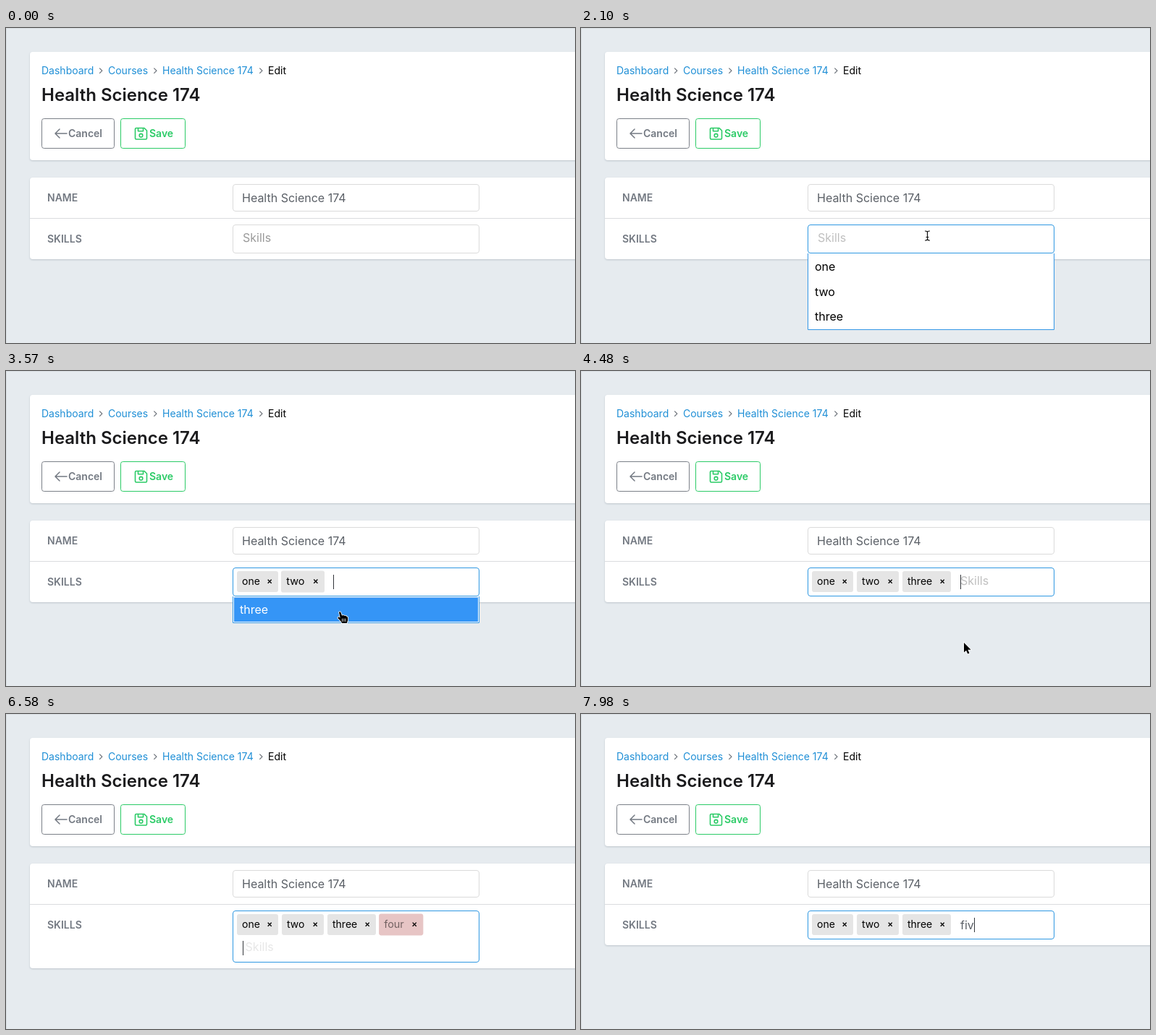
Write an HTML page that moves like this. It is 786x436 px and loops after 8000 ms.

```html
<!DOCTYPE html>
<html lang="en">
<head>
<meta charset="utf-8">
<title>Edit course</title>
<style>
  html, body { margin: 0; width: 100%; height: 100%; overflow: hidden; background: #e6ebef; }
  svg { display: block; width: 786px; height: 436px; font: 16px Inter, Roboto, sans-serif; }
  text { white-space: pre; }
  .sm { font-size: 14px; }
  .semi { font-weight: 600; }
  .link { fill: #1f8fd6; }
  .label { fill: #737982; }
  .value { fill: #5b6067; }
  .card { fill: #fff; filter: drop-shadow(0 1px 1.2px rgba(30, 45, 60, .2)); }
  .line { fill: none; stroke-linecap: round; stroke-linejoin: round; }
</style>
</head>
<body>
<svg viewBox="0 0 786 436">
  <rect width="786" height="436" fill="#e6ebef"/>
  <path d="M0 .5H786M.5 0V436" stroke="#d9dee2" fill="none"/>

  <rect class="card" x="33" y="33" width="780" height="150" rx="4"/>
  <g class="sm">
    <text class="link" x="49" y="64">Dashboard</text>
    <text class="link" x="141" y="64">Courses</text>
    <text class="link" x="216" y="64">Health Science 174</text>
    <text x="362" y="64">Edit</text>
  </g>
  <path class="line" stroke="#666c74" stroke-width="1.2"
    d="M129.5 55.8l3.3 3.3-3.3 3.3M204.7 55.8l3.3 3.3-3.3 3.3M350.7 55.8l3.3 3.3-3.3 3.3"/>
  <text class="semi" x="49" y="101" font-size="24" fill="#1b1b1d">Health Science 174</text>

  <rect x="49.5" y="125.5" width="100" height="41" rx="3" fill="#fff" stroke="#7b8088"/>
  <path class="line" stroke="#737982" stroke-width="1.5" d="M84 146H68.5M74 140l-6 6 6 6"/>
  <text class="sm semi label" x="86" y="151">Cancel</text>

  <rect x="158.5" y="125.5" width="89" height="41" rx="3" fill="#fff" stroke="#2bcb66"/>
  <path class="line" stroke="#2bcb66" stroke-width="1.6"
    d="M180 138.5h11l3.5 3.5v10.500q0 1.500-1.500 1.500h-13q-1.500 0-1.500-1.500v-12.500q0-1.500 1.500-1.500M182.500 138.800v4h7v-4"/>
  <circle cx="186.500" cy="148.700" r="2.300" fill="none" stroke="#2bcb66" stroke-width="1.600"/>
  <text class="sm semi" x="198" y="151" fill="#2bcb66">Save</text>

  <rect id="card" class="card" x="33" y="207" width="780" height="113" rx="4"/>
  <path d="M33 263.5H786" stroke="#dadcdf"/>
  <text class="sm semi label" x="57" y="240">NAME</text>
  <text class="sm semi label" x="57" y="297">SKILLS</text>
  <rect x="313.5" y="216.5" width="340" height="37" rx="3.5" fill="#fff" stroke="#dbdbdb"/>
  <text class="value" x="326" y="241">Health Science 174</text>

  <rect id="field" x="313.5" y="272.5" width="340" height="39" rx="3.5" fill="#fff"/>
  <g id="tags"></g>
  <text id="hint">Skills</text>
  <text id="typed" class="value"></text>
  <rect id="caret" width="1" height="20" fill="#33363b"/>

  <g id="list">
    <path id="box" fill="#fff" stroke="#3397e6"/>
  </g>

  <g id="arrow">
    <path d="M0 0V13.500L3.100 10.700 5.200 15.500 7.500 14.500 5.400 9.800H9.600Z" stroke="#fff" stroke-width="1.600" paint-order="stroke"/>
  </g>
  <g id="beam" class="line">
    <path d="M-3-6.500q3 0 3 2q0-2 3-2M0-4.500V4.500M-3 6.500q3 0 3-2q0 2 3 2M-1.500 2h3" stroke="#fff" stroke-width="3"/>
    <path d="M-3-6.500q3 0 3 2q0-2 3-2M0-4.500V4.500M-3 6.500q3 0 3-2q0 2 3 2M-1.500 2h3" stroke="#111" stroke-width="1.200"/>
  </g>
  <g id="hand">
    <path d="M-2 0q1.500-1.500 2.500.5l1.500 4 2-.5 1.500.8 2 0 1.200 1.200q1.500 0 1.500 2v3l-1.500 4h-6.500l-2-3-3.800-4q0-1.800 2-1.300l1.300 1Z"
      stroke="#fff" stroke-width="1.600" paint-order="stroke"/>
    <path class="line" stroke="#fff" stroke-width=".8" d="M2.500 9v3.500M4.800 9v3.500M7 9v3.500"/>
  </g>
</svg>
<script>
const LOOP = 8000, STEP = 70;
const FOCUS = 1450, PICK = [2950, 3360, 3780], ADD = 6360, DROP = 7345, GONE = 7625;
const WORDS = ["one", "two", "three"];

const TAGS = [
  { word: "one", x: 319, w: 57, at: PICK[0] },
  { word: "two", x: 381, w: 58, at: PICK[1] },
  { word: "three", x: 444, w: 67, at: PICK[2] },
  { word: "four", x: 516, w: 59.5, at: ADD, bad: true }
];
const TYPED = [[0, ""], [5105, "f"], [5245, "fo"], [5385, "fou"], [5525, "four"],
  [ADD, ""], [7690, "f"], [7830, "fi"], [7970, "fiv"]];
const CARET = [[FOCUS, 1950], [2450, 4760], [5105, 6020], [ADD, 6640], [7140, GONE], [7690, LOOP]];
// time, x, y of the pointer's hot spot
const PATH = [[280, 506, 437], [980, 478.5, 347], [1120, 478.5, 347], [1400, 478.5, 287.5],
  [2660, 478.5, 287.5], [2900, 462, 334], [3900, 462, 334], [4450, 529, 376]];
// start, opacity, shift of the placeholder
const HINT = [[0, .4, 0], [FOCUS, .25, 0], [PICK[0], 0, 6], [3960, .25, 0],
  [5105, 0, 6], [6535, .25, 0], [7690, 0, 6]];

const $ = id => document.getElementById(id);
const set = (el, attrs) => { for (const k in attrs) el.setAttribute(k, attrs[k]); return el; };
const make = (name, parent, attrs) =>
  set(parent.appendChild(document.createElementNS("http://www.w3.org/2000/svg", name)), attrs);
const show = (el, on) => { el.style.display = on ? "" : "none"; };
const clamp = v => Math.max(0, Math.min(1, v));
const out = v => 1 - (1 - v) ** 2;
const smooth = v => v * v * (3 - 2 * v);
const mix = (a, b, v) => a + (b - a) * v;
const lastAt = (rows, t) => rows.reduce((best, r, i) => t >= r[0] ? i : best, 0);

for (const tag of TAGS) {
  tag.el = make("g", $("tags"), {});
  make("rect", tag.el, { x: tag.x, y: 277, width: tag.w, height: 29, rx: 3, fill: tag.bad ? "#e7c5c5" : "#e5e5e5" });
  make("text", tag.el, { x: tag.x + 7, y: 296, class: "sm", opacity: tag.bad ? .5 : 1 }).textContent = tag.word;
  make("path", tag.el, { d: `M${tag.x + tag.w - 14.3} 288.700l5 5m0-5l-5 5`, stroke: "#000", "stroke-width": 1.3 });
}
const rows = WORDS.map(() => ({
  bg: make("rect", $("list"), { x: 315, width: 337, height: 33.6 }),
  label: make("text", $("list"), { x: 323 })
}));

function bump(p) {
  if (p >= 1) return 1;
  return p < .3 ? mix(1, 1.2, out(p / .3)) : mix(1.2, 1, out((p - .3) / .7));
}

function drawTags(t) {
  for (const tag of TAGS) {
    const left = tag.bad ? clamp((t - DROP) / 200) : 0;
    show(tag.el, t >= tag.at && left < 1);
    const s = bump((t - tag.at) / 300) * (1 - left);
    const cx = tag.x + tag.w / 2, to = tag.x + tag.w * (1 - left) / 2;
    set(tag.el, { transform: `translate(${to} 291.5) scale(${s}) translate(${-cx} -291.5)`, opacity: 1 - left });
  }
}

function drawInput(t) {
  const tall = t >= ADD && t < GONE;
  const count = PICK.filter(p => t >= p).length;
  const x = count && !tall ? TAGS[count - 1].x + TAGS[count - 1].w + 13 : 327;
  const dy = tall ? 32 : 0;
  set($("card"), { height: 113 + dy });
  set($("field"), { height: 39 + dy, stroke: t >= FOCUS ? "#2f98e2" : "#dbdbdb" });

  const text = TYPED[lastAt(TYPED, t)][1];
  $("typed").textContent = text;
  set($("typed"), { x, y: 298 + dy });

  const i = lastAt(HINT, t), now = HINT[i], was = HINT[Math.max(0, i - 1)];
  const v = out(clamp((t - now[0]) / (now[1] ? 200 : 60)));
  set($("hint"), { x: x + mix(was[2], now[2], v), y: 296 + dy, "fill-opacity": mix(was[1], now[1], v) });

  show($("caret"), CARET.some(c => t >= c[0] && t < c[1]));
  set($("caret"), { x: Math.round(x + (text ? $("typed").getComputedTextLength() : 0)), y: 282 + dy });
}

function pointer(t) {
  const i = lastAt(PATH, t), a = PATH[i], b = PATH[i + 1] || a;
  const v = smooth(clamp((t - a[0]) / (b[0] - a[0] || 1)));
  return { x: mix(a[1], b[1], v), y: mix(a[2], b[2], v) };
}

function drawList(t, p) {
  const open = t >= FOCUS && t < PICK[2];
  const words = WORDS.filter((w, i) => t < PICK[i]);
  const end = 313.5 + words.length * 34.6;
  show($("list"), open);
  set($("box"), { d: `M313.5 312V${Math.round(end) + .5}H653.5V312` });
  rows.forEach((row, i) => {
    const y = 313.4 + i * 34.6, over = p.y >= y && p.y < y + 34.6;
    const used = i < words.length;
    show(row.bg, used);
    show(row.label, used);
    set(row.bg, { y, fill: over ? "#3595f6" : "#fff" });
    set(row.label, { y: y + 22.6, fill: over ? "#fff" : "#000" });
    row.label.textContent = words[i] || "";
  });
  return open && p.y > 313 && p.y < end;
}

function drawPointer(t, p, onList) {
  const seen = t >= 280 && t < 4760;
  const onField = p.y > 272 && p.y < 312;
  const kind = onList ? "hand" : onField ? "beam" : "arrow";
  for (const id of ["arrow", "beam", "hand"]) show($(id), seen && id === kind);
  set($(kind), { transform: `translate(${p.x} ${p.y})` });
}

function draw(time) {
  const t = Math.floor(time % LOOP / STEP) * STEP;
  const p = pointer(t);
  drawTags(t);
  drawInput(t);
  drawPointer(t, p, drawList(t, p));
}

const start = performance.now();
function tick() {
  draw(performance.now() - start);
  requestAnimationFrame(tick);
}
tick();
</script>
</body>
</html>
```
